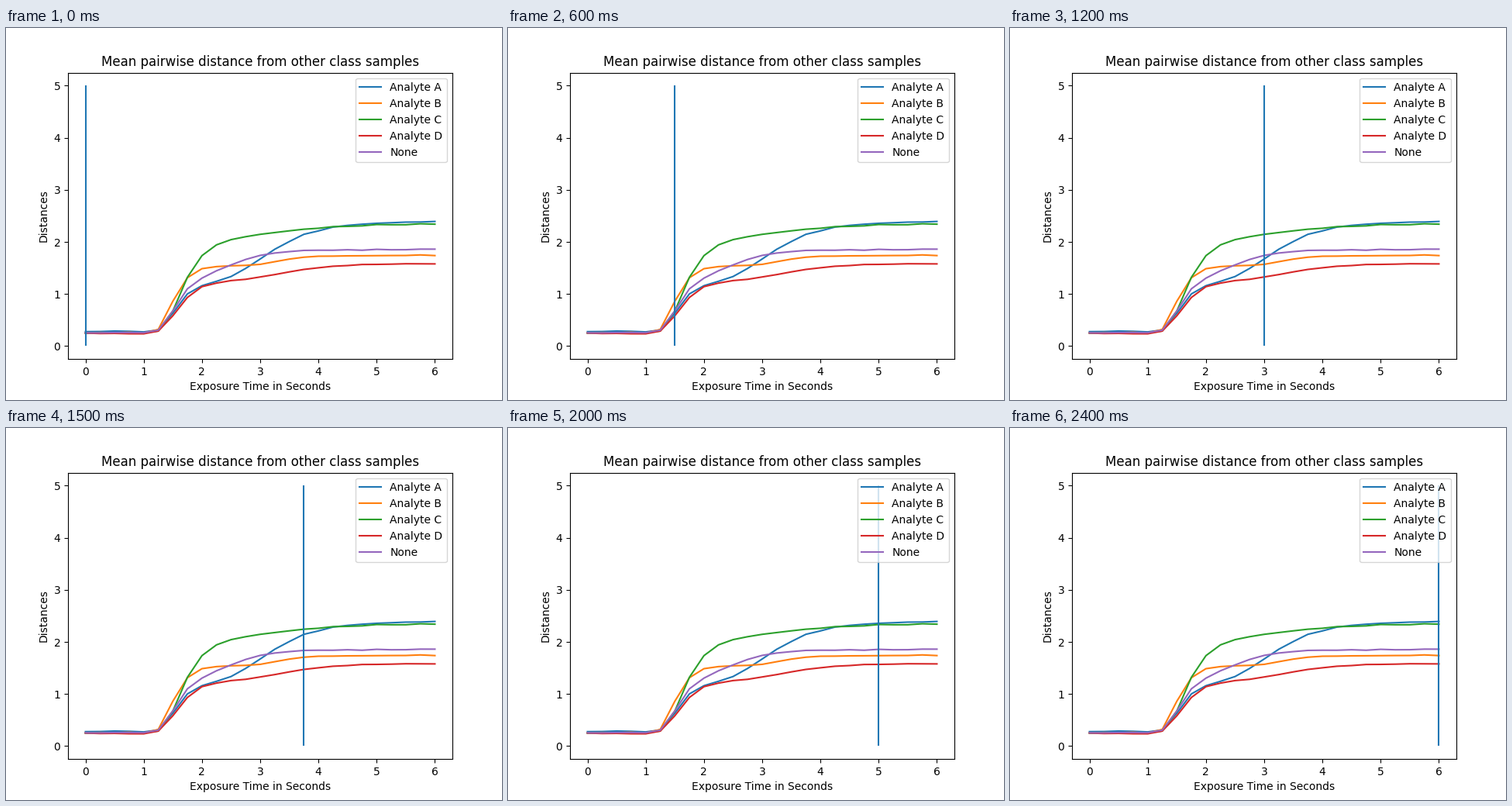
Recreate the animation shown at these times as a matplotlib script. Size 640x480 px, loop 2.5 s.

```python
import matplotlib.pyplot as plt
import numpy as np
from matplotlib.animation import FuncAnimation

STEP = 0.25
END = 6
times = np.arange(0, END + STEP, STEP)
rng = np.random.default_rng(4)

# label: baseline, then (height, centre, width) of the fast and the slow rise
responses = {
    "Analyte A": (0.28, (0.96, 1.5, 0.2), (1.15, 2.99, 0.55)),
    "Analyte B": (0.26, (1.28, 1.45, 0.18), (0.2, 3.2, 0.35)),
    "Analyte C": (0.25, (1.8, 1.59, 0.25), (0.3, 3.1, 0.8)),
    "Analyte D": (0.245, (1.02, 1.525, 0.245), (0.315, 3.25, 0.55)),
    "None": (0.255, (1.15, 1.5, 0.215), (0.445, 2.5, 0.4)),
}


def rise(t, height, centre, width):
    """Gompertz curve: sharp onset, gentle levelling off."""
    return height * np.exp(-np.exp(-(t - centre) / width))


def response(t, base, fast, slow):
    noise = rng.normal(0, 0.005, t.size)
    return base + rise(t, *fast) + rise(t, *slow) + noise


plt.rcParams["font.family"] = "DejaVu Sans"
fig, ax = plt.subplots(figsize=(6.4, 4.8), dpi=100)

for label, params in responses.items():
    ax.plot(times, response(times, *params), label=label)
marker = ax.vlines(0, 0, 5, color="C0")

ax.set_xlim(-0.3, 6.3)
ax.set_ylim(-0.25, 5.25)
ax.set_title("Mean pairwise distance from other class samples")
ax.set_xlabel("Exposure Time in Seconds")
ax.set_ylabel("Distances")
ax.legend(loc="upper right")


def update(i):
    x = i * STEP
    marker.set_segments([[(x, 0), (x, 5)]])
    return [marker]


anim = FuncAnimation(fig, update, frames=times.size, interval=100,
                     repeat=True, repeat_delay=0)
plt.show()
```
